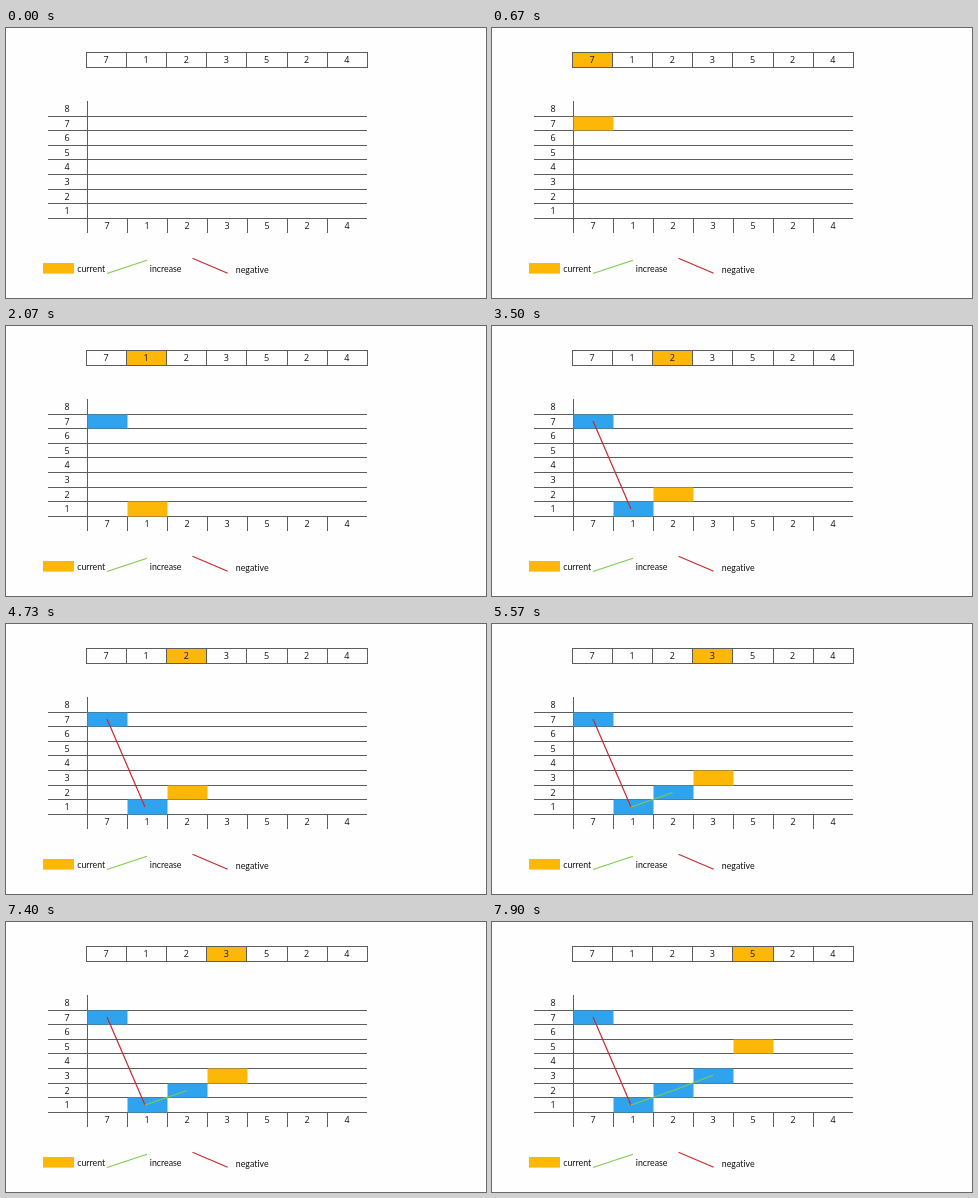
Animation of 480 by 270 pixels, one loop 8000 ms. Source, as an HTML page:

```html
<!DOCTYPE html>
<html lang="en">
<head>
<meta charset="utf-8">
<title>Longest increasing run</title>
<style>
  html, body { margin: 0; width: 100%; height: 100%; overflow: hidden; background: #fefefe; }
  svg { display: block; width: 480px; height: 270px; }
  text { font: 8.8px Lato, "Noto Sans", sans-serif; font-variant-ligatures: none; fill: #111; }
  .digit { font: 9px "Open Sans", "Noto Sans", sans-serif; text-anchor: middle; }
  .rule { stroke: #5c5c5c; stroke-width: 1; shape-rendering: crispEdges; }
  .up { stroke: #7fcb50; stroke-width: 1.2; }
  .down { stroke: #c92a30; stroke-width: 1.2; }
</style>
</head>
<body>
<svg id="stage" viewBox="0 0 480 270"></svg>
<script>
const LOOP = 8000;
const values = [7, 1, 2, 3, 5, 2, 4];
const stepTimes = [400, 1370, 3430, 5570, 7630]; // moment each value becomes current
const ORANGE = '#fdb706', BLUE = '#2fa3ee';
const nodes = [[101, 95], [139, 183], [180.5, 168.7], [221, 153.2]];

const stage = document.getElementById('stage');
const add = (tag, attrs) => {
  const el = document.createElementNS('http://www.w3.org/2000/svg', tag);
  for (const key in attrs) el.setAttribute(key, attrs[key]);
  return stage.appendChild(el);
};
const line = (x1, y1, x2, y2, cls = 'rule') => add('line', { x1, y1, x2, y2, class: cls });
const rect = (x, y, width, height, fill) => add('rect', { x, y, width, height, fill });
const label = (str, x, y, cls = '') => { add('text', { x, y, class: cls }).textContent = str; };

const stripX = i => Math.round(79.9 + 40.13 * i);
const chartX = i => 81.5 + 40 * i;
const rowY = v => Math.round(189.85 - 14.6 * v) + .5;

// Array strip
const strip = values.map((v, i) => rect(stripX(i), 25, stripX(i + 1) - stripX(i), 14, ORANGE));
for (const y of [24.5, 39.5]) line(80, y, 362, y);
for (let i = 0; i <= values.length; i++) line(stripX(i) + .5, 24, stripX(i) + .5, 40);

// Chart grid
for (let row = 0; row < 8; row++) {
  line(42, rowY(row), 361, rowY(row));
  label(row + 1, 61, 186.1 - 14.6 * row, 'digit');
}
line(81.5, 73, 81.5, 205);
values.forEach((v, i) => {
  if (i) line(chartX(i), 190, chartX(i), 205);
  label(v, 100 + 40.13 * i, 35.3, 'digit');
  label(v, 101.2 + 40 * i, 201.2, 'digit');
});

const bars = values.map((v, i) => rect(chartX(i), rowY(v), 40, rowY(v - 1) - rowY(v), BLUE));
const links = nodes.slice(1).map((p, i) =>
  line(...nodes[i], ...p, values[i + 1] > values[i] ? 'up' : 'down'));

// Legend
rect(37, 235, 31, 10.6, ORANGE);
label('current', 71.2, 244);
line(101, 245.5, 141, 232.3, 'up');
label('increase', 143.8, 244);
line(186.5, 230.2, 221.7, 245.3, 'down');
label('negative', 229.8, 245);

const show = (el, on) => el.setAttribute('visibility', on ? 'visible' : 'hidden');

function draw(now) {
  const t = now % LOOP;
  const current = stepTimes.filter(s => t >= s).length - 1;
  strip.forEach((el, i) => show(el, i === current));
  bars.forEach((el, i) => {
    show(el, i <= current);
    el.setAttribute('fill', i === current ? ORANGE : BLUE);
  });
  links.forEach((el, i) => show(el, i + 1 < current));
}

const start = performance.now();
function frame() {
  draw(performance.now() - start);
  requestAnimationFrame(frame);
}
frame();
</script>
</body>
</html>
```
